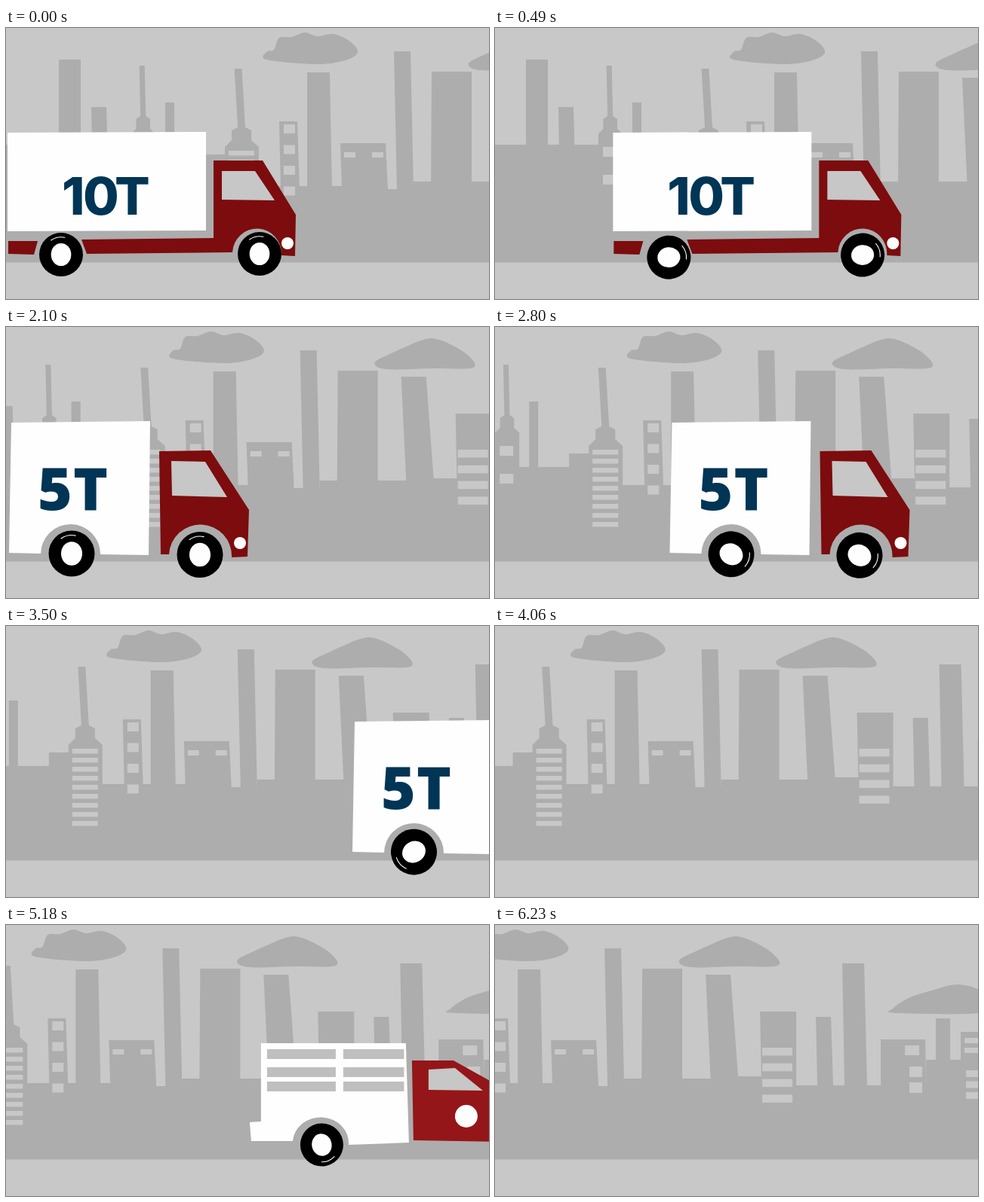
An HTML page that plays this animation: 640x360 px, repeating every 6300 ms.

```html
<!DOCTYPE html>
<html lang="en">
<head>
<meta charset="utf-8">
<title>Delivery trucks</title>
<style>
  html, body { margin: 0; width: 100%; height: 100%; overflow: hidden; background: #c8c8c8; }
  svg { display: block; width: 100%; height: 100%; }
  .city { fill: #adadad; }
  .sky { fill: #c8c8c8; }
  .white { fill: #fefefe; }
  .dark { fill: #7c0c0e; }
  .red { fill: #941618; }
  .glass { fill: #c6c7c6; }
  .slat { fill: #bfbfbf; }
  .glint { fill: none; stroke: #fff; stroke-width: 1.1; stroke-linecap: round; }
  text { fill: #003556; font-weight: 800; }
  .ten { font-family: Inter, sans-serif; font-size: 69px; }
  .five { font-family: "Open Sans", sans-serif; font-size: 78px; }
</style>
</head>
<body>
<svg viewBox="0 0 640 360">
  <rect class="sky" width="640" height="360"/>
  <g id="scene">
    <path class="city" d="M-10 311.5V155H166V186H264V168H300V210H505V214H540V204H691V201H760V213H940V179H1040V311.5Z"/>
  </g>

  <g class="truck">
    <path class="white" d="M2 139 265 138V269L2 270Z"/>
    <path class="dark" d="M3 283H42L37 301 3 300ZM100 281 275 279V176H340L384 248 383 303 365 302A32 33 0 0 0 300 298L107 300Z"/>
    <path class="glass" d="M286 190H330L356 229 286 228Z"/>
    <circle class="white" cx="373" cy="286" r="8"/>
    <text class="ten" x="74 102 144" y="248">10T</text>
  </g>

  <g class="truck">
    <path class="white" d="M7 127 191 125 189 303 125 302A39 39 0 0 0 46 301L4 300Z"/>
    <path class="dark" d="M203 165 271 164 322 243 320 305 299 306A41 41 0 0 0 216 302H205Z"/>
    <path class="glass" d="M219 178 264 179 293 226 220 224Z"/>
    <circle class="white" cx="310" cy="287" r="8"/>
    <text class="five" x="42 89" y="243">5T</text>
  </g>

  <g class="truck" id="pickup">
    <path class="white" d="M146 157H338L342 289 262 292A37 34 0 0 0 188 287H133L131 262 146 261Z"/>
    <path class="red" d="M346 180H401L469 218Q475 222 482 222L532 224Q545 225 546 234L547 267H562V289L530 290A36 36.5 0 0 0 457 288L348 286Z"/>
    <path class="glass" d="M368 192 403 190 440 220 368 219Z"/>
    <circle class="white" cx="418" cy="254" r="15"/>
  </g>
</svg>
<script>
const LOOP = 6300, TURN = LOOP / 3, STEP = 70, SCROLL = 373;
const $ = s => document.querySelector(s);
const NS = 'http://www.w3.org/2000/svg';
const scene = $('#scene');

function add(parent, tag, attrs = {}) {
  const el = document.createElementNS(NS, tag);
  for (const k in attrs) el.setAttribute(k, attrs[k]);
  parent.append(el);
  return el;
}
const city = d => add(scene, 'path', { class: 'city', d });

// A tower that leans and widens a little towards its foot
function tower(x, width, top, lean = 2, spread = 1) {
  city(`M${x} ${top}h${width}L${x + width + lean + spread} 215H${x + lean}Z`);
}

// A tower with a neck and a mast
function spire(x, w, top, neck, lean) {
  const mid = x + w * .49, half = w * .11, n = w * .29, eave = neck + 13;
  city(`M${x} 311V${eave + w * .2}L${mid - n} ${eave}V${neck}L${mid - half} ${neck - 4}
    L${mid - half - lean} ${top}h${half * 2}L${mid + half} ${neck - 4}
    L${mid + n} ${neck}V${eave}L${x + w} ${eave + w * .2}V311Z`);
}

function panes(x, y, width, height, pitch = 0, count = 1) {
  for (let i = 0; i < count; i++)
    add(scene, 'rect', { class: 'sky', x, y: y + i * pitch, width, height });
}

// Smooth closed curve through a few points
function cloud(...p) {
  const at = i => p[(i + p.length) % p.length];
  const handle = (i, s) => [0, 1].map(k => at(i)[k] + s * (at(i + 1)[k] - at(i - 1)[k]) / 6).join(' ');
  city('M' + p[0].join(' ') + p.map((_, i) =>
    `C${handle(i, 1)} ${handle(i + 1, -1)} ${at(i + 1).join(' ')}`).join('') + 'Z');
}

tower(70, 29, 42, 0, 0);
tower(113, 20, 105);
spire(166, 32, 50, 121, 1.5);
panes(172, 158, 18, 13, 37, 2);
tower(211, 12, 99, 0, 0);
spire(290, 45, 54, 136, 4.5);
panes(295, 163, 34, 6.5, 12, 9);
tower(362, 24, 124);
panes(368, 128, 15, 12, 27.5, 4);
tower(399, 30, 59, 0, 3);
tower(443, 60, 153);
panes(448, 165, 15, 7);
panes(485, 165, 15, 7);
tower(514, 22, 31, 4, 0);
tower(564, 53, 58, -1);
tower(648, 33, 66, 7, 4);
tower(720, 48, 115, 2, -2);
panes(723, 163, 40, 10.5, 20.8, 4);
tower(794, 20, 122);
tower(829, 29, 51, 3);
tower(880, 59, 152, 0);
panes(912, 160, 19, 13);
panes(918, 188, 17, 14, 21, 2);
tower(953, 19, 124, 0, 0);
tower(986, 54, 142, 0);
panes(991, 150, 29, 7, 13, 2);
panes(993, 193, 27, 9, 14.5, 3);

cloud([345, 42], [346, 31], [355, 29], [362, 13], [378, 12], [396, 6],
  [413, 11], [434, 8], [456, 18], [466, 33], [446, 44], [408, 48]);
cloud([613, 47], [637, 34], [657, 25], [671, 19], [689, 15],
  [711, 22], [737, 38], [743, 54], [690, 55], [628, 56]);
cloud([896, 111], [917, 97], [944, 88], [984, 79], [1020, 92], [1020, 116], [901, 117]);

// Openings in the sides of the pickup bed
for (const y of [165, 189, 208])
  for (const [x, width] of [[154, 91], [255, 80.5]])
    add($('#pickup'), 'rect', { class: 'slat', x, y, width, height: 13 });

// Wheels: pivot x, y and how far the tyre sits off the pivot
const trucks = [
  { from: 0, speed: .315, radius: 29, wheels: [[72.5, 304.5, .5, -3.5], [333.5, 299, 2.5, 1]] },
  { from: 0, speed: .325, radius: 30.5, wheels: [[86, 301, 1, 0], [256, 302.5, 1, 0]] },
  { from: -107, speed: .305, radius: 28.5, wheels: [[226.5, 292, 0, 0], [492, 294, 0, 0]] }
];

function makeWheel(parent, r, [x, y, dx, dy]) {
  const spin = add(parent, 'g');
  const tyre = add(spin, 'g', { transform: `translate(${dx} ${dy})` });
  add(tyre, 'circle', { r });
  add(tyre, 'ellipse', { class: 'white', rx: r * .46, ry: r * .52 });
  const arc = r * .8;
  const at = deg => [Math.cos, Math.sin].map(f => f(deg * Math.PI / 180) * arc).join(' ');
  add(tyre, 'path', { class: 'glint', d: `M${at(-125)}A${arc} ${arc} 0 0 1 ${at(-78)}` });
  return deg => spin.setAttribute('transform', `translate(${x} ${y}) rotate(${deg})`);
}

document.querySelectorAll('.truck').forEach((el, i) => {
  const truck = trucks[i];
  truck.el = el;
  truck.spins = truck.wheels.map(w => makeWheel(el, truck.radius, w));
});

function render(time) {
  const t = Math.floor(time % LOOP / STEP) * STEP;
  scene.setAttribute('transform', `translate(${-SCROLL * t / LOOP} 0)`);
  trucks.forEach((truck, i) => {
    const age = t - i * TURN;
    const on = age >= 0 && age < TURN;
    truck.el.style.display = on ? '' : 'none';
    if (!on) return;
    truck.el.setAttribute('transform', `translate(${truck.from + truck.speed * age} 0)`);
    truck.spins.forEach(spin => spin(360 * age / TURN));
  });
}

const start = performance.now();
function tick() {
  render(performance.now() - start);
  requestAnimationFrame(tick);
}
tick();
</script>
</body>
</html>
```
